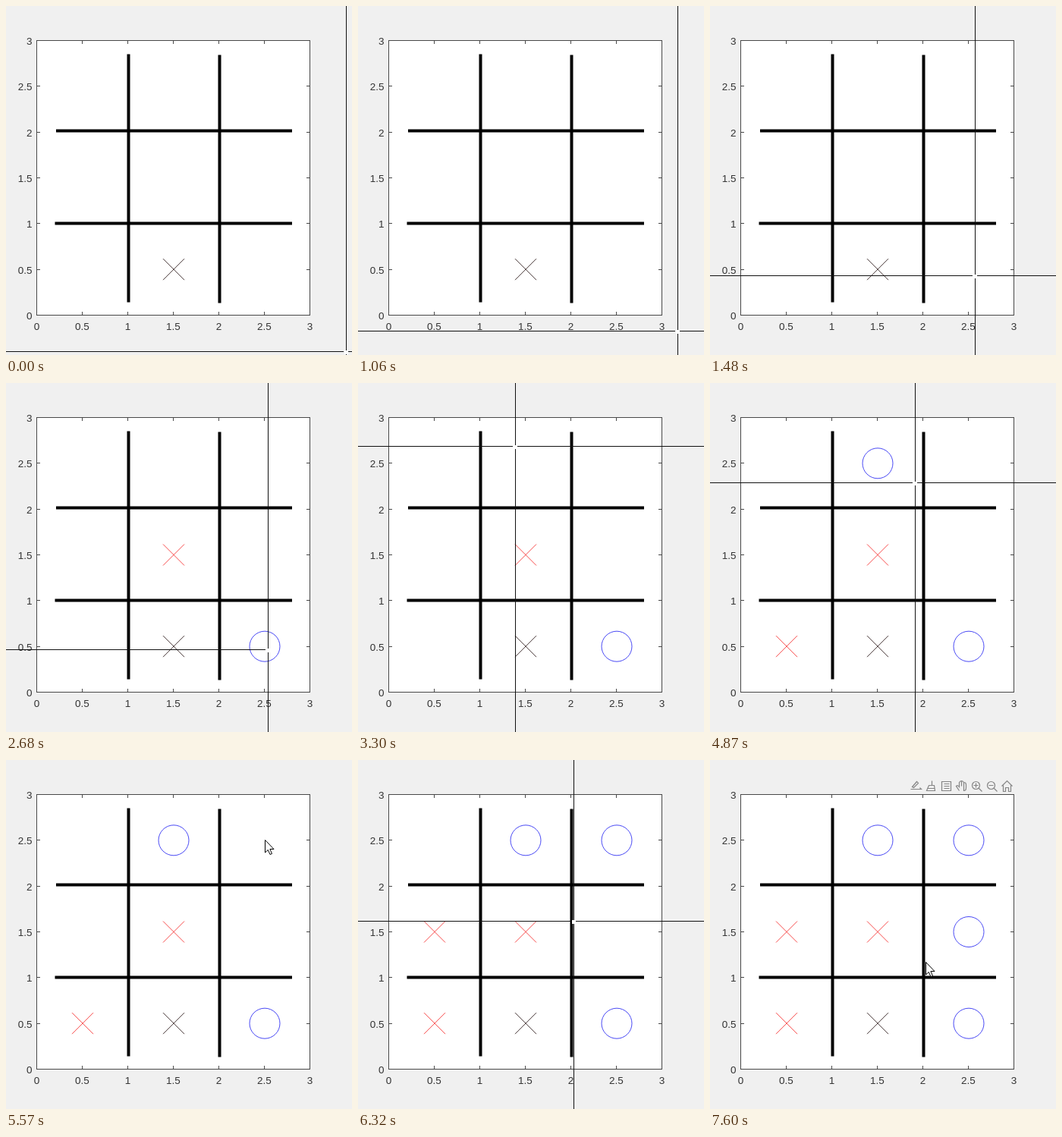
Write an HTML page that moves like this. It is 456 px wide and 460 px high and loops after 8 s.

```html
<!DOCTYPE html>
<html lang="en">
<head>
<meta charset="utf-8">
<title>Noughts and crosses</title>
<style>
  html, body { margin: 0; width: 100%; height: 100%; overflow: hidden; background: #f0f0f0; }
  svg { display: block; width: 100vw; height: 100vh; }
  text { font: 13.5px "Liberation Sans", Arial, sans-serif; fill: #333; }
  .crisp { shape-rendering: crispEdges; }
</style>
</head>
<body>
<svg viewBox="0 0 456 460" fill="none">
  <rect width="456" height="460" fill="#f0f0f0"/>
  <rect class="crisp" x="40.5" y="45.5" width="360" height="362" fill="#fff" stroke="#484848"/>
  <g id="axes"></g>
  <path d="M161.500 63.500V390.500M281.500 64.500V391.500M66 164.500H377M64.500 286.500H377" stroke="#000" stroke-width="4"/>
  <g id="marks"></g>
  <g id="tools" stroke="#858585" stroke-width="1.2"></g>
  <g id="cross" class="crisp">
    <path id="lines" stroke="#111"/>
    <rect id="gap" width="5" height="5" fill="#fff"/>
  </g>
  <path id="arrow" d="M0 0V16.500L3.800 13L6.500 19L9 18L6.400 12H11.500Z" fill="#fff" stroke="#000"/>
</svg>
<script>
const LOOP = 8000, WAIT = 300;
const $ = id => document.getElementById(id);
const px = v => 40.5 + v * 120;
const py = v => 407.5 - v * 362 / 3;

function add(parent, tag, attrs, text) {
  const el = document.createElementNS("http://www.w3.org/2000/svg", tag);
  for (const k in attrs) el.setAttribute(k, attrs[k]);
  if (text !== undefined) el.textContent = text;
  $(parent).append(el);
  return el;
}

let ticks = "";
for (let v = 0; v <= 3; v += 0.5) {
  const x = px(v), y = Math.floor(py(v)) + 0.5;
  ticks += `M${x} 407v-4M${x} 46v4M41 ${y}h4M400 ${y}h-4`;
  add("axes", "text", { x, y: 427, "text-anchor": "middle" }, v);
  add("axes", "text", { x: 34.5, y: y + 5, "text-anchor": "end" }, v);
}
add("axes", "path", { d: ticks, stroke: "#484848", class: "crisp" });

const lens = "M4-1A5 5 0 1 0-6-1A5 5 0 1 0 4-1M3 3L7 7M-4-1H2";
[
  "M-7 4H3M-5 1L1-6L3-4L-3 2ZM2 4H7L5 2",
  "M1-7V-1M-3-1H4L5 6H-6ZM-4 3H4",
  "M-6-6H6V6H-6ZM-3-3H4M-3 0H4M-3 3H4",
  "M-3 6L-7 0Q-5-2-3 1V-5Q0-9 3-5V0M0-7V0M3-5Q6-5 6-2V2Q6 6 3 6Z",
  lens + "M-1-4V2",
  lens,
  "M-7 0L0-7L7 0M-5-1V7H-2V2H2V7H5V-1"
].forEach((d, i) => add("tools", "path", { d, transform: `translate(${271.5 + 20 * i} 34.5)` }));

// every turn: the player's click, the chosen cell and the reply's cell
const turns = [
  { click: 2320, o: [2, 0], x: [1, 1] },
  { click: 3350, o: [1, 2], x: [0, 0] },
  { click: 5500, o: [2, 2], x: [0, 1] },
  { click: 7190, o: [2, 1] }
];

const marks = [];
function cross([col, row], at, stroke = "#f84848") {
  const d = `M${px(col + 0.5) - 13.5} ${py(row + 0.5) - 14}l28 28m0 -28l-28 28`;
  marks.push({ at, el: add("marks", "path", { d, stroke }) });
}
function ring([col, row], at) {
  const at0 = { cx: px(col + 0.5) + 0.5, cy: py(row + 0.5), r: 20, stroke: "#4848f5" };
  marks.push({ at, el: add("marks", "circle", at0) });
}
cross([1, 0], 0, "#463636");
for (const { click, o, x } of turns) {
  ring(o, click + WAIT);
  if (x) cross(x, click + WAIT);
}

// pointer strokes, each slowing down into its stop
const home = [448, 456];
const strokes = [
  { from: 990, to: 1740, stop: [345, 352] },
  { from: 2750, to: 3360, stop: [207, 84] },
  { from: 3400, to: 3500, stop: [221, 98] },
  { from: 4300, to: 4870, stop: [270, 132] },
  { from: 4940, to: 5300, stop: [341, 105] },
  { from: 5800, to: 6320, stop: [284, 213] },
  { from: 6390, to: 6840, stop: [332, 228] },
  { from: 7190, to: 7600, stop: [284, 266] }
];
const easeOut = k => 1 - (1 - k) ** 3;

function pointer(t) {
  let pos = home;
  for (const { from, to, stop } of strokes) {
    if (t < from) break;
    const k = easeOut(Math.min(1, (t - from) / (to - from)));
    pos = pos.map((p, i) => p + (stop[i] - p) * k);
  }
  return pos.map(Math.round);
}

const show = (el, on) => el.setAttribute("visibility", on ? "visible" : "hidden");

function draw(t) {
  const [x, y] = pointer(t);
  const turn = turns.findLast(({ click }) => t >= click);
  const since = turn ? t - turn.click : LOOP;
  const over = turn === turns.at(-1);
  const isArrow = over || since < WAIT;

  for (const m of marks) show(m.el, t >= m.at);
  show($("cross"), !isArrow);
  show($("arrow"), isArrow);
  show($("tools"), over && since >= WAIT);

  // the right arm returns a moment after the others
  const right = since < WAIT + 100 ? "" : `M${x + 3} ${y - 0.5}H456`;
  $("lines").setAttribute("d",
    `M0 ${y - 0.5}H${x - 3}${right}M${x + 0.5} 0V${y - 2}M${x + 0.5} ${y + 3}V460`);
  $("gap").setAttribute("x", x - 2);
  $("gap").setAttribute("y", y - 2);
  $("arrow").setAttribute("transform", `translate(${x + 0.5} ${y + 0.5})`);
}

const start = performance.now();
function tick(now) {
  draw(Math.max(0, now - start) % LOOP);
  requestAnimationFrame(tick);
}
draw(0);
requestAnimationFrame(tick);
</script>
</body>
</html>
```
